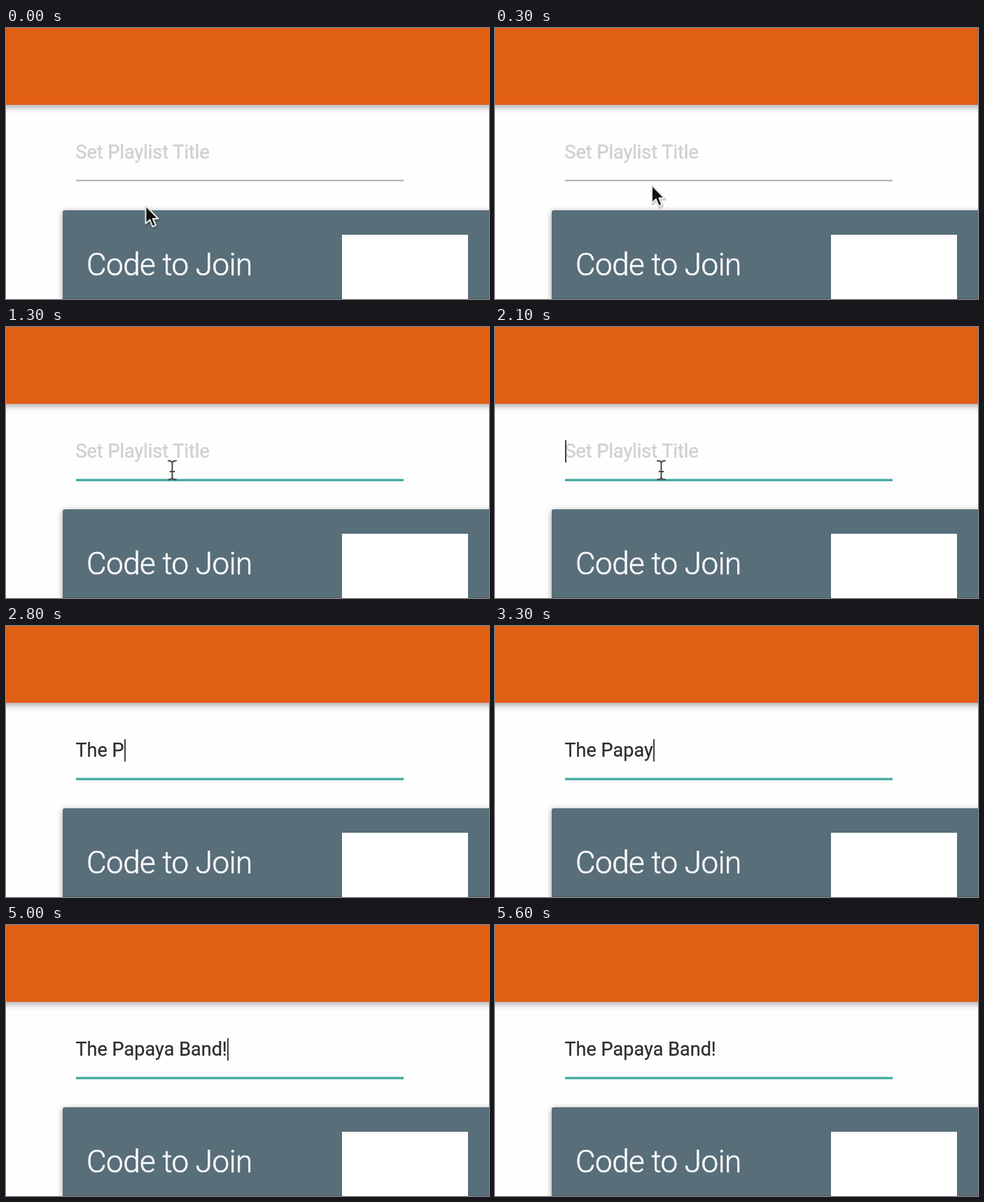
Animation of 690x388 px, one loop 5.8 s. Source, as an HTML page:

```html
<!DOCTYPE html>
<html lang="en">
<head>
<meta charset="utf-8">
<title>Playlist title field</title>
<style>
  html, body { margin: 0; width: 100%; height: 100%; overflow: hidden; background: #fefefe; }
  body { position: relative; font-family: Roboto, Arial, sans-serif; }
  body > * { position: absolute; }
  header { left: -20px; right: -20px; top: -20px; height: 130px; background: #e16016;
    box-shadow: 0 3px 9px rgba(0, 0, 0, .36); }
  .text { left: 99.5px; top: 162px; font-size: 27px; line-height: 32px; white-space: pre; }
  .text, .label { filter: blur(.45px); }
  #hint { color: #d0d0d0; -webkit-text-stroke: .5px #d0d0d0; }
  #typed { color: #2c2c2c; font-kerning: none; -webkit-text-stroke: .25px #2c2c2c; }
  #caret { position: absolute; left: calc(100% + .5px); top: 0; width: 1.6px; height: 32px; background: #444; }
  .card { left: 81px; top: 261px; width: 640px; height: 126px; border-radius: 3px 3px 0 0;
    background: #586e79; border-bottom: 2px solid #4b5e68; box-shadow: 0 2px 9px rgba(0, 0, 0, .4); }
  .label { left: 115px; top: 313px; font-size: 44px; line-height: 52px; font-weight: 300;
    letter-spacing: -.55px; color: #fafafa; white-space: pre; -webkit-text-stroke: .6px #fafafa; }
  .tile { left: 480px; top: 296px; width: 180px; height: 92px; background: #fff; }
  svg { left: 0; top: 0; width: 690px; height: 388px; }
</style>
</head>
<body>
<header></header>
<div class="text" id="hint">Set Playlist Title</div>
<div class="text"><span id="typed"></span><i id="caret"></i></div>
<div class="card"></div>
<div class="label">Code to Join</div>
<div class="tile"></div>
<svg viewBox="0 0 690 388">
  <rect id="line" x="100" width="468"/>
  <g id="arrow" stroke-linejoin="round">
    <path d="M0 0V25.5L6 20L10 30L14.4 28L10.4 18.5H18Z" transform="translate(1 2)"
      fill="none" stroke="#000" stroke-opacity=".18" stroke-width="3.5"/>
    <path d="M0 0V25.5L6 20L10 30L14.4 28L10.4 18.5H18Z" fill="#111" stroke="#e8e8e8" stroke-width="2"/>
  </g>
  <g id="beam" fill="none" stroke-linecap="round">
    <path d="M-5.5 -13.5Q0 -13.5 0 -10Q0 -13.5 5.5 -13.5M0 -10V10M-5.5 13.5Q0 13.5 0 10Q0 13.5 5.5 13.5M-3 2H3"
      stroke="#4a4a4a" stroke-width="2"/>
  </g>
</svg>
<script>
  const LOOP = 5800, FOCUS = 700;
  const TITLE = "The Papaya Band!";
  // Time of each key press
  const KEYS = [2200, 2400, 2500, 2600, 2800, 2900, 3000, 3200,
                3300, 3600, 3800, 4100, 4200, 4400, 4500, 5000];
  // Pointer steps: time, x, y
  const MOVES = [[0, 199.5, 254.5], [100, 203, 251], [200, 212, 240],
                 [300, 224, 225], [400, 233, 212], [500, 237.5, 205]];
  // Underline steps: time, top, height, colour
  const LINES = [[0, 217.5, 1.7, "#a2a2a2"], [700, 217.5, 2.5, "#83aaa6"],
                 [800, 217.5, 3.3, "#58b3aa"], [900, 217.5, 3.3, "#42a9a0"]];

  const $ = id => document.getElementById(id);
  const show = (el, on) => { el.style.visibility = on ? "visible" : "hidden"; };
  const stepAt = (steps, t) => steps.filter(s => s[0] <= t).pop();

  function draw(t) {
    const count = KEYS.filter(k => k <= t).length;
    $("typed").textContent = TITLE.slice(0, count);
    show($("hint"), !count);

    // The blink restarts with every key
    const since = t - (count ? KEYS[count - 1] : FOCUS);
    show($("caret"), since >= 0 && since % 1000 < 500);

    const [, top, height, colour] = stepAt(LINES, t);
    $("line").setAttribute("y", top);
    $("line").setAttribute("height", height);
    $("line").setAttribute("fill", colour);

    const [, x, y] = stepAt(MOVES, t);
    const overField = y < 219;
    for (const id of ["arrow", "beam"]) {
      $(id).setAttribute("transform", `translate(${x} ${y})`);
      show($(id), !count && overField === (id === "beam"));
    }
  }

  function tick() {
    draw(performance.now() % LOOP);
    requestAnimationFrame(tick);
  }
  tick();
</script>
</body>
</html>
```
